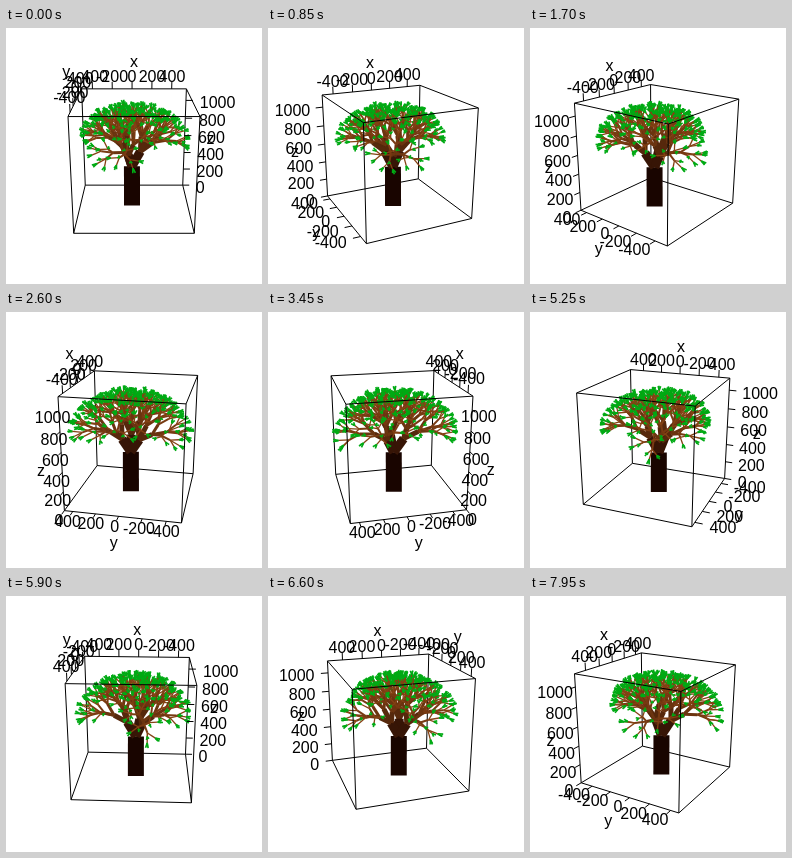
Recreate the animation shown at these times as an HTML page with a canvas. Size 256 by 256 pixels, loop 8 s.

```html
<!DOCTYPE html>
<html lang="en">
<head>
<meta charset="utf-8">
<title>Spinning 3D tree</title>
<style>
  html, body { margin: 0; width: 100%; height: 100%; overflow: hidden; background: #fff; }
  canvas { display: block; width: 256px; height: 256px; }
</style>
</head>
<body>
<canvas id="stage" width="256" height="256"></canvas>
<script>
const ctx = document.getElementById('stage').getContext('2d');
const STEP_MS = 50, STEPS = 160, STEP_DEG = 1.5, HALF_TURN = 120;
const FOCAL = 477.7, DISTANCE = 8.52, TICK = 2 / 15;
const TILT = 20 * Math.PI / 180, SIN = Math.sin(TILT), COS = Math.cos(TILT);

// Data values to the cube from -1 to 1
const scale = [v => v / 529 - 0.037, v => v / 500 + 0.05, v => v / 563.4 - 1];
const toCube = p => p.map((v, i) => scale[i](v));

let spinCos = 1, spinSin = 0;
function project([x, y, z]) {
  const side = x * spinCos - y * spinSin;
  const away = x * spinSin + y * spinCos;
  const depth = DISTANCE + COS * away - SIN * z;
  const k = FOCAL / depth;
  return { x: 128 + side * k, y: 128 - (SIN * away + COS * z) * k, depth };
}

function line(a, b, color, width) {
  ctx.strokeStyle = color;
  ctx.lineWidth = width;
  ctx.beginPath();
  ctx.moveTo(a.x, a.y);
  ctx.lineTo(b.x, b.y);
  ctx.stroke();
}

// ---- Tree ----
let seed = 11;
const random = () => (seed = seed * 16807 % 2147483647) / 2147483647;
const LENGTHS = [441, 175, 150, 128, 108, 92, 46];
const WIDTHS = [16, 9, 5, 3, 2, 1.3, 1.6];
const COLORS = ['#190500', '#371506', '#56280c', '#6b3410', '#783a12', '#844214', '#00aa14'];
const LAST = WIDTHS.length - 1;
const branches = [];

function grow(from, dir, level) {
  const to = from.map((v, i) => v + dir[i] * LENGTHS[level]);
  branches.push({ from: toCube(from), to: toCube(to), level });
  if (level === LAST) return;
  const [dx, dy, dz] = dir;
  const flat = Math.hypot(dx, dy);
  const u = flat < 0.01 ? [1, 0, 0] : [-dy / flat, dx / flat, 0];
  const v = [dy * u[2] - dz * u[1], dz * u[0] - dx * u[2], dx * u[1] - dy * u[0]];
  const start = level ? random() * 2 * Math.PI : 0.157;
  const spread = level === LAST - 1 ? 0.28 : 0.48;
  for (let i = 0; i < 3; i++) {
    const turn = start + i * 2 * Math.PI / 3;
    const bend = spread + random() * 0.08;
    const child = dir.map((d, j) => d * Math.cos(bend) +
      (u[j] * Math.cos(turn) + v[j] * Math.sin(turn)) * Math.sin(bend));
    grow(to, child, level + 1);
  }
}
grow([0, 0, 0], [0, 0, 1], 0);

function drawTree() {
  branches
    .map(({ from, to, level }) => ({ a: project(from), b: project(to), level }))
    .sort((p, q) => q.a.depth + q.b.depth - p.a.depth - p.b.depth)
    .forEach(({ a, b, level }) => line(a, b, COLORS[level], WIDTHS[level]));
}

// ---- Box ----
const edges = [];
for (let axis = 0; axis < 3; axis++)
  for (const s of [-1, 1])
    for (const t of [-1, 1]) {
      const a = [s, s, s], b = [s, s, s];
      a[(axis + 2) % 3] = b[(axis + 2) % 3] = t;
      a[axis] = -1;
      b[axis] = 1;
      edges.push([a, b]);
    }

function drawBox(front) {
  for (const [p, q] of edges) {
    const a = project(p), b = project(q);
    if ((a.depth + b.depth < 2 * DISTANCE) === front) line(a, b, '#000', 1);
  }
}

// ---- Axes ----
function text(label, { x, y }, align) {
  ctx.fillText(label, x - ctx.measureText(label).width * align, y + 7.5);
}

// Ticks point along `out`; the title also moves a little along `drift`.
function drawAxis(axis, name, corner, out, drift, values, align) {
  const at = (value, outward, sideways = 0) => {
    const p = corner.slice();
    p[axis] = value;
    p[out] += Math.sign(p[out]) * outward * TICK;
    p[drift] += Math.sign(p[drift]) * sideways * TICK;
    return project(p);
  };
  for (const v of values) {
    const u = scale[axis](v);
    line(at(u, 0), at(u, 1), '#000', 1);
    text(String(v), at(u, 2), align);
  }
  text(name, at(0, 4, 1), 0.5);
}

const FLAT_VALUES = [-400, -200, 0, 200, 400];
const HEIGHT_VALUES = [0, 200, 400, 600, 800, 1000];

function drawAxes(step) {
  const sx = step > 0 && step <= HALF_TURN ? -1 : 1;
  const sy = spinCos > -1e-9 ? 1 : -1;
  const m = step % HALF_TURN;
  const yOnTop = Math.min(m, HALF_TURN - m) <= 13;
  const lean = sx * spinCos;
  const align = Math.abs(lean) < 0.33 ? 0.5 : 0.5 - lean / 2;

  drawAxis(0, 'x', [0, sy, 1], 2, 1, FLAT_VALUES, 0.5);
  if (yOnTop) drawAxis(1, 'y', [-sx, 0, 1], 2, 0, FLAT_VALUES, 0.5);
  else drawAxis(1, 'y', [sx, 0, -1], 0, 2, FLAT_VALUES, align);
  drawAxis(2, 'z', [sx, sy, 0], 0, 1, HEIGHT_VALUES, align);
}

function draw(now) {
  const step = Math.floor(now / STEP_MS) % STEPS;
  const angle = step * STEP_DEG * Math.PI / 180;
  spinCos = Math.cos(angle);
  spinSin = Math.sin(angle);

  ctx.fillStyle = '#fff';
  ctx.fillRect(0, 0, 256, 256);
  ctx.fillStyle = '#000';
  ctx.font = '16px "Liberation Sans", Arial, sans-serif';
  drawBox(false);
  drawTree();
  drawBox(true);
  drawAxes(step);
}

const began = performance.now();
function frame() {
  draw(performance.now() - began);
  requestAnimationFrame(frame);
}
frame();
</script>
</body>
</html>
```
